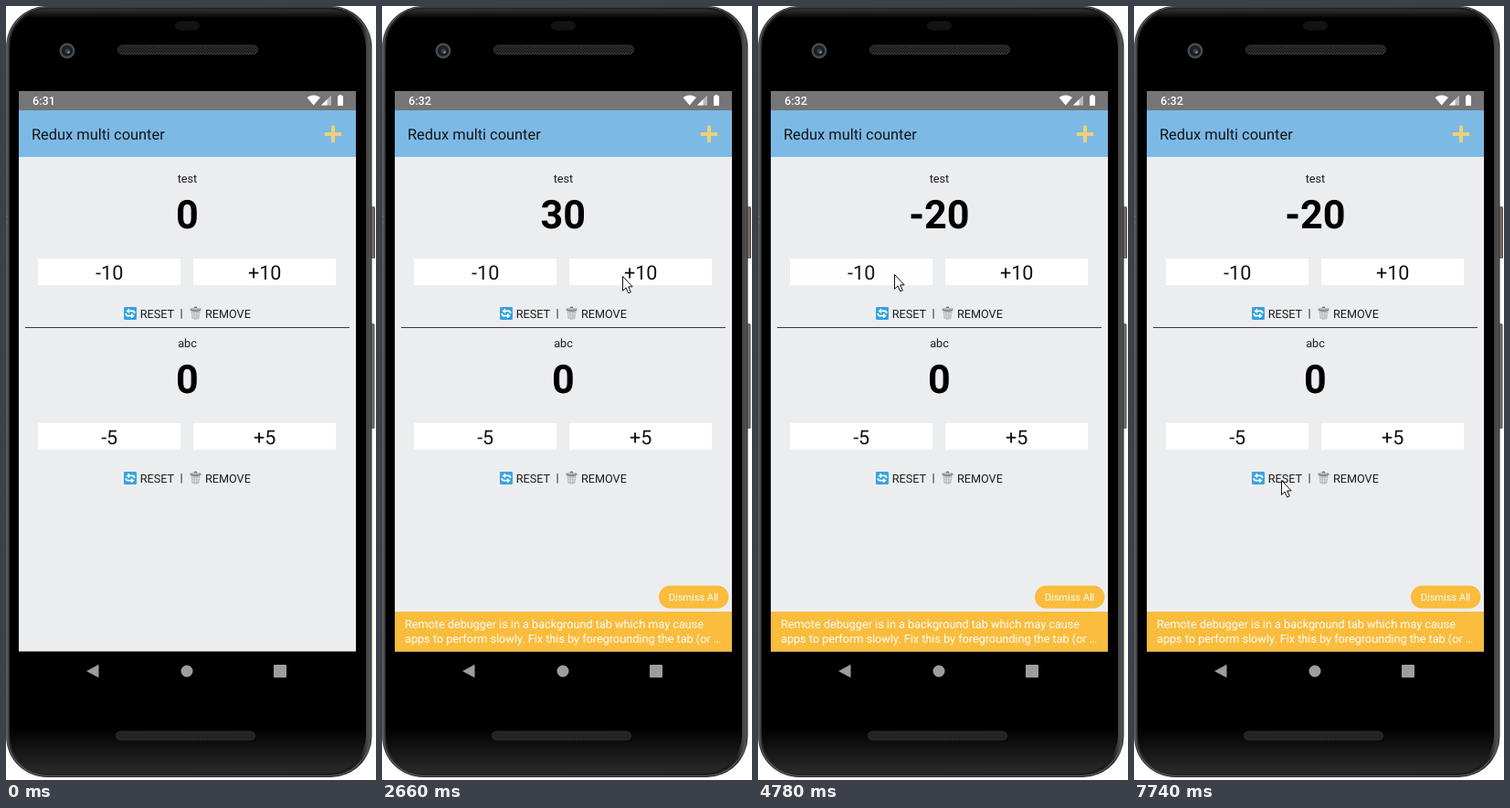
An HTML page for the animation above (8 s loop, 405 by 846 pixels).

```html
<!DOCTYPE html>
<html lang="en">
<head>
<meta charset="utf-8">
<title>Redux multi counter</title>
<style>
  html, body { margin: 0; width: 100%; height: 100%; overflow: hidden; background: #fff; }
  svg { display: block; width: 405px; height: 846px; font-family: Roboto, sans-serif; text-rendering: geometricPrecision; }
  .label { font-size: 12.67px; fill: #1c1c1c; }
  .count { font-size: 43.2px; font-weight: 700; fill: #000; }
  .key { font-size: 21.55px; fill: #111; }
  .mid { text-anchor: middle; }
</style>
</head>
<body>
<svg viewBox="0 0 405 846">
  <defs>
    <linearGradient id="rim" x2="1" y2="0">
      <stop offset="0" stop-color="#5a5a5a"/><stop offset=".012" stop-color="#262626"/>
      <stop offset=".97" stop-color="#1d1d1d"/><stop offset=".99" stop-color="#4c4c4c"/>
      <stop offset="1" stop-color="#2c2c2c"/>
    </linearGradient>
    <linearGradient id="face" x2="0" y2="1">
      <stop offset="0" stop-color="#333"/><stop offset=".012" stop-color="#000"/>
      <stop offset=".94" stop-color="#000"/><stop offset="1" stop-color="#2a2a2a"/>
    </linearGradient>
    <linearGradient id="side" x2="1" y2="0">
      <stop offset="0" stop-color="#333"/><stop offset=".5" stop-color="#8a8480"/><stop offset="1" stop-color="#4a4644"/>
    </linearGradient>
    <pattern id="mesh" width="3" height="3" patternUnits="userSpaceOnUse">
      <rect width="3" height="3" fill="#181818"/><path d="M0 0L3 3M3 0L0 3" stroke="#343434" stroke-width=".7"/>
    </pattern>
    <g id="cycle">
      <rect x="129" y="329" width="14" height="14" rx="1.2" fill="#36a3e2"/>
      <g fill="none" stroke="#fff" stroke-width="1.7">
        <path d="M140.6 336V335.2Q140.6 333.4 138.6 333.4H134"/>
        <path d="M131.4 336V336.8Q131.4 338.6 133.4 338.6H138"/>
      </g>
      <path d="M131.5 333.4L135 330.5V336.3ZM140.5 338.6L137 335.7V341.5Z" fill="#fff"/>
    </g>
    <g id="bin">
      <path d="M202.3 332.2L203.6 341.6Q207.5 343.8 211.4 341.6L212.7 332.2Z" fill="#b4b6b7"/>
      <path d="M204.4 334L205.4 341.5M207.5 334.5V342M210.6 334L209.6 341.5M203 336.4H212M203.5 339.2H211.5" stroke="#dedfe0" stroke-width=".8"/>
      <ellipse cx="207.5" cy="331.7" rx="6.2" ry="2" fill="#76797b"/>
      <ellipse cx="207.5" cy="331" rx="5.4" ry="1.3" fill="#b9bbbc"/>
      <path d="M206 329.4H209" stroke="#666" stroke-width="1.2"/>
    </g>
  </defs>

  <g id="phone">
    <rect x="398" y="219" width="6" height="57" rx="1.5" fill="url(#side)"/>
    <rect x="398" y="347" width="5.5" height="115" rx="1.5" fill="url(#side)"/>
    <rect width="400.5" height="843" rx="45" fill="url(#rim)"/>
    <rect x="1.5" y="1" width="397" height="840.5" rx="43.5" fill="none" stroke="#5a5a5a" stroke-width="1.2"/>
    <rect x="4" y="3.5" width="390" height="835" rx="41" fill="url(#face)"/>
    <path d="M0 230H2M0 237H2" stroke="#777"/>
    <rect x="185" y="16.5" width="27" height="10" rx="5" fill="#131313"/>
    <circle cx="67" cy="49" r="7.3" fill="#1a1d21" stroke="#484b4e" stroke-width="2.4"/>
    <circle cx="67.5" cy="49.5" r="3" fill="#343d47"/>
    <circle cx="68.5" cy="50.5" r="1.2" fill="#8b929a"/>
    <rect x="122.5" y="43" width="153" height="9.5" rx="4.7" fill="url(#mesh)" stroke="#383838"/>
    <rect x="120.5" y="793" width="152" height="9" rx="4.5" fill="url(#mesh)" stroke="#303030"/>
    <g fill="#9d9d9d">
      <path d="M88 727L101.5 719.7V734.3Z"/>
      <circle cx="198" cy="727" r="6.5"/>
      <rect x="293" y="720" width="14" height="14" rx="1"/>
    </g>
  </g>

  <g id="screen">
    <rect x="14" y="93" width="369" height="612.5" fill="#ecedef"/>
    <rect x="14" y="93" width="369" height="21" fill="#757575"/>
    <text id="clock" x="29" y="108" font-size="12.6" font-weight="500" fill="#fff"></text>
    <path d="M329.5 100Q336.7 95.2 344 100L336.7 108.6Z" fill="#fff"/>
    <path d="M356 97.5V108.5H345Z" fill="#b9b9b9"/>
    <path d="M351.5 102V108.5H345Z" fill="#fff"/>
    <path d="M364.7 97H367.3V98.3H369V109H363V98.3H364.7Z" fill="#fff"/>
    <rect x="14" y="114" width="369" height="51" fill="#7cb9e5"/>
    <text x="28" y="146" font-size="16.4" fill="#161616">Redux multi counter</text>
    <path d="M348.8 140H367.2M358 130.8V149.2" stroke="#edd07a" stroke-width="4"/>
    <g id="rows"></g>
    <path d="M21 351.5H376" stroke="#3c3c3c"/>
    <g id="warning" fill="#fff">
      <rect x="303" y="633.5" width="76.5" height="25" rx="12.5" fill="#f9bc3c"/>
      <text x="341" y="650" class="mid" font-size="11">Dismiss All</text>
      <rect x="14" y="662" width="369" height="43.5" fill="#f9bc3c"/>
      <g font-size="12.67">
        <text x="25" y="680">Remote debugger is in a background tab which may cause</text>
        <text x="25" y="696">apps to perform slowly. Fix this by foregrounding the tab (or …</text>
      </g>
    </g>
  </g>

  <g id="pointer">
    <circle id="halo" r="12" fill="#f6f05f" opacity=".88"/>
    <path d="M.5 .5V16.3L4.1 12.9L6.7 18.9L9.3 17.8L6.7 11.9H11.2Z" fill="#fff" stroke="#111" stroke-linejoin="round"/>
  </g>
</svg>

<script>
const LOOP = 8000, HALO = 120, FADE = 250, DIM = 0.2;
const $ = id => document.getElementById(id);

const row = (name, step, dy, i) => `
  <g transform="translate(0 ${dy})">
    <text class="label mid" x="198.5" y="193">${name}</text>
    <text class="count mid" x="198.3" y="243" id="count${i}">0</text>
    ${[[-step, 35, 'minus'], ['+' + step, 205, 'plus']].map(([text, x, id]) => `
    <g id="${id}${i}">
      <rect x="${x}" y="276" width="156" height="29" fill="#fff"/>
      <text class="key mid" x="${x + 78.2}" y="299">${text}</text>
    </g>`).join('')}
    <g id="reset${i}"><use href="#cycle"/><text class="label" x="146.8" y="340.5">RESET</text></g>
    <text class="label mid" x="192" y="340">|</text>
    <use href="#bin"/><text class="label" x="218" y="340.5">REMOVE</text>
  </g>`;
$('rows').innerHTML = row('test', 10, 0, 0) + row('abc', 5, 180, 1);

// click time, button down, button up, button, counter, new value
const clicks = [
  [1180, 1460, 1500, 'plus0', 0, 10],
  [1560, 1640, 1720, 'plus0', 0, 20],
  [2150, 2270, 2370, 'plus0', 0, 30],
  [3180, 3240, 3420, 'minus0', 0, 20],
  [3460, 3520, 3700, 'minus0', 0, 10],
  [3740, 3800, 3980, 'minus0', 0, 0],
  [4020, 4080, 4260, 'minus0', 0, -10],
  [4300, 4360, 4560, 'minus0', 0, -20],
  [5510, 5570, 5710, 'plus1', 1, 5],
  [5790, 5850, 5980, 'plus1', 1, 10],
  [7260, 7330, 7490, 'reset1', 1, 0]
];
const buttons = [...new Set(clicks.map(c => c[3]))];

// pointer stops: time, x, y
const path = [
  [110, 394, 776], [140, 359, 583], [170, 405, 583],
  [660, 397, 256], [800, 285, 295], [2630, 285, 295], [2660, 264, 295],
  [2770, 155, 292], [3020, 155, 292], [3050, 149, 293], [4820, 149, 293],
  [5460, 260, 473], [6720, 260, 473], [6910, 240, 489], [7150, 161, 518], [LOOP, 161, 518]
];

const ease = p => p < 0.5 ? 2 * p * p : 1 - 2 * (1 - p) ** 2;

function pointerAt(t) {
  const i = path.findIndex(p => p[0] > t);
  const [t0, x0, y0] = path[i - 1], [t1, x1, y1] = path[i];
  let p = (t - t0) / (t1 - t0);
  if (t1 - t0 > 300) p = ease(p);
  return [x0 + (x1 - x0) * p, y0 + (y1 - y0) * p];
}

function draw(t) {
  const values = [0, 0];
  const opacity = Object.fromEntries(buttons.map(b => [b, 1]));
  let halo = false;
  for (const [at, down, up, button, counter, value] of clicks) {
    if (t >= at && t < at + HALO) halo = true;
    if (t >= down) opacity[button] = DIM + (1 - DIM) * ease(Math.min(1, Math.max(0, (t - up) / FADE)));
    if (t >= up) values[counter] = value;
  }
  values.forEach((v, i) => { $('count' + i).textContent = v; });
  buttons.forEach(b => $(b).setAttribute('opacity', opacity[b]));

  $('clock').textContent = t < 2400 ? '6:31' : '6:32';
  $('warning').style.display = t < 1460 ? 'none' : '';
  $('halo').style.display = halo ? '' : 'none';

  const visible = (t >= 110 && t < 170) || t >= 660;
  $('pointer').style.display = visible ? '' : 'none';
  if (visible) $('pointer').setAttribute('transform', `translate(${pointerAt(t)})`);
}

const start = performance.now();
function tick() {
  draw((performance.now() - start) % LOOP);
  requestAnimationFrame(tick);
}
tick();
</script>
</body>
</html>
```
